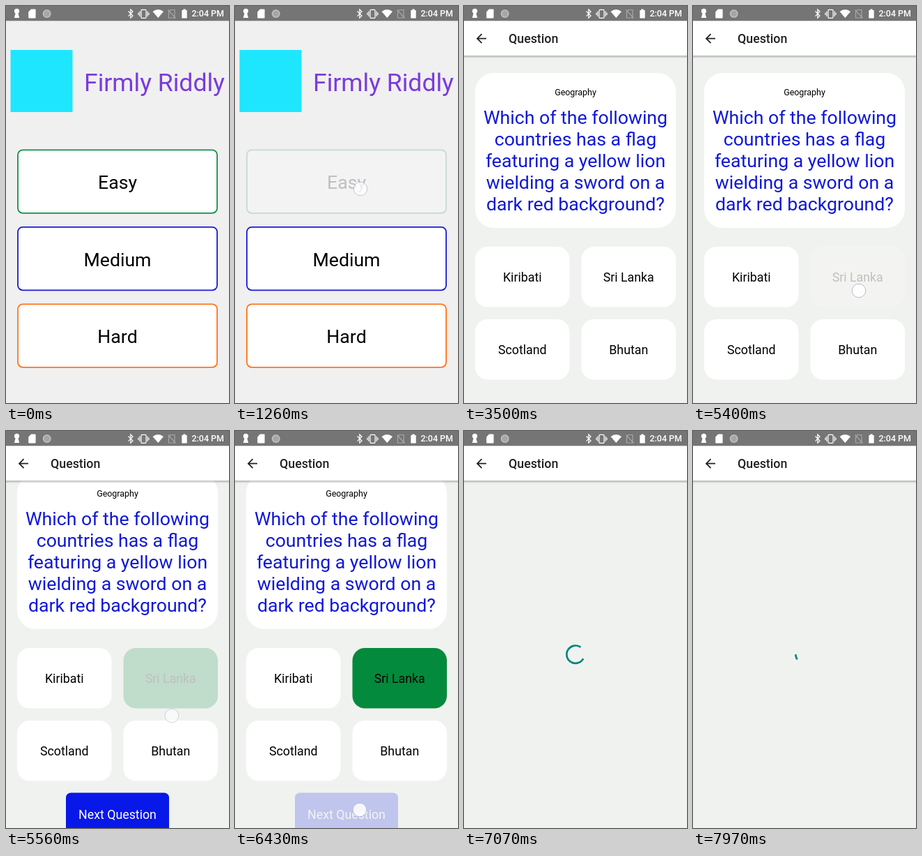
Animation of 320x569 px, one loop 8 s. Source, as an HTML page:

```html
<!DOCTYPE html>
<html lang="en">
<head>
<meta charset="utf-8">
<title>Quiz app</title>
<style>
html, body { margin: 0; width: 100%; height: 100%; overflow: hidden; background: #fff; }
svg { display: block; width: 100%; height: 100%; font-family: Roboto, "Open Sans", sans-serif; }
</style>
</head>
<body>
<svg id="stage" viewBox="0 0 320 569"></svg>
<script>
const LOOP = 8000;
const PUSH = 1319, LOADED = 1890, POP = 6527;   // screen changes
const EASY_TAP = 1130, ANSWER_TAP = 5400, NEXT_TAP = 6430;
const BG = '#f0f2ef', GREEN = '#048a3c';

// Markup helpers
const label = (x, y, size, text, fill = '#000', extra = 'text-anchor="middle"') =>
  `<text x="${x}" y="${y}" font-size="${size}" fill="${fill}" ${extra}>${text}</text>`;
const box = (x, y, w, h, r, fill, extra = '') =>
  `<rect x="${x}" y="${y}" width="${w}" height="${h}" rx="${r}" fill="${fill}" ${extra}/>`;
const group = (id, body, extra = '') => `<g id="${id}" ${extra}>${body}</g>`;
const screen = (id, bg, body) =>
  group(id, box(0, 21, 320, 548, 0, bg) + body, 'clip-path="url(#window)"');
const spinner = id =>
  `<circle id="${id}" cx="160" cy="320.2" r="12.67" pathLength="360" fill="none"
    stroke="#008577" stroke-width="2.67" stroke-linecap="square"/>`;

const level = (id, y, text, color) => group(id,
  box(17, y, 286, 90.5, 7, '#fff', `stroke="${color}" stroke-width="1.8"`) +
  label(160, y + 55.7, 26.67, text));

const answer = (id, x, y, text) => group(id,
  box(x, y, 135.5, 86.5, 17.8, '#fff') + label(x + 67.75, y + 50, 17.78, text));

const header = box(0, 71, 320, 4, 0, 'url(#shade)') + box(0, 21, 320, 50.1, 0, '#fff') +
  `<path transform="translate(14.2 36) scale(.889)" fill="#222"
    d="M20 11H7.83l5.59-5.59L12 4l-8 8 8 8 1.41-1.41L7.83 13H20z"/>` +
  label(64, 53, 17.78, 'Question', '#222', 'font-weight="500"');

const question = ['Which of the following', 'countries has a flag', 'featuring a yellow lion',
  'wielding a sword on a', 'dark red background?'];

const content =
  box(16, 96, 288, 222, 26.7, '#fff') +
  label(160, 127.5, 12.44, 'Geography') +
  question.map((line, i) => label(160, 168.6 + i * 31.1, 26.67, line, '#1018d8')).join('') +
  answer('kiribati', 16, 345, 'Kiribati') +
  answer('correct', 168.5, 345, 'Sri Lanka') +
  answer('scotland', 16, 449, 'Scotland') +
  answer('bhutan', 168.5, 449, 'Bhutan') +
  group('nextButton', box(86, 552.5, 148, 62, 7, '#0818e8') +
    label(160, 589.5, 17.78, 'Next Question', '#fff'));

const statusBar = box(0, 0, 320, 21.3, 0, '#757575') + `
  <g fill="#fff">
    <circle cx="15.5" cy="7.3" r="3.6"/><path d="M14 9h3l2.2 8h-7.4z"/>
    <path d="M36 4.6h5.6q1 0 1 1v10.8q0 1-1 1h-8.4q-1 0-1-1V8.6z"/>
    <circle cx="58.7" cy="11" r="6" fill="#bdbdbd"/>
    <circle cx="58.7" cy="11" r="4.2" fill="#a6a6a6"/>
    <path d="M210.5 8Q218.300 1.800 226 8L218.300 17z"/>
    <path d="M252.300 6h2V4.600h3.400V6h2v11.400h-7.400z"/>
  </g>
  <g fill="none" stroke="#fff" stroke-width="1.2">
    <path d="M175.500 7.500l6.500 6.600-3.200 3V5l3.200 3-6.500 6.600"/>
    <rect x="194" y="5.300" width="7" height="12" rx="1"/>
    <path d="M191.900 7.500v7.500M190 9.500v3.500M203.100 7.500v7.500M205 9.500v3.500"/>
    <path stroke="#a8a8a8" d="M236 5.500h6v11.500h-8.500V8zM232.500 5.500l11 12"/>
  </g>` + label(266.5, 15.3, 12.44, '2:04 PM', '#fff', 'font-weight="500"');

stage.innerHTML = `
  <defs>
    <clipPath id="window"><rect y="21" width="320" height="548"/></clipPath>
    <linearGradient id="shade" x2="0" y2="1">
      <stop stop-opacity=".28"/><stop offset="1" stop-opacity="0"/>
    </linearGradient>
  </defs>` +
  screen('home', '#f0f0f0',
    box(6.5, 63, 89, 89, 0, '#1ee6ff') +
    label(112, 121.5, 35.56, 'Firmly Riddly', '#7b3bdc', '') +
    level('easy', 206.3, 'Easy', '#149048') +
    level('medium', 316.8, 'Medium', '#1a1ad6') +
    level('hard', 427.3, 'Hard', '#ff7518')) +
  screen('upcoming', BG, spinner('spinB') + header) +
  screen('quiz', BG, spinner('spinA') + group('content', content) + header) +
  group('status', statusBar) +
  '<circle id="dot" r="9.8" fill="#fff" fill-opacity=".85" stroke="#b8bcd4"/>';

const $ = id => document.getElementById(id);
const set = (id, attrs) => {
  for (const k in attrs) $(id).setAttribute(k, attrs[k]);
};
const show = (id, on) => set(id, { visibility: on ? 'visible' : 'hidden' });
const clamp = x => Math.max(0, Math.min(1, x));

// Cubic Bézier easing, solved by bisection
const bezier = (x1, y1, x2, y2) => x => {
  const at = (a, b, u) => 3 * u * (1 - u) ** 2 * a + 3 * u * u * (1 - u) * b + u ** 3;
  let lo = 0, hi = 1;
  for (let i = 0; i < 24; i++) {
    const mid = (lo + hi) / 2;
    if (at(x1, x2, mid) < x) lo = mid; else hi = mid;
  }
  return at(y1, y2, lo);
};
const standard = bezier(.4, 0, .2, 1);
const emphasized = bezier(.2, 0, 0, 1);
const quad = x => x < .5 ? 2 * x * x : 1 - 2 * (1 - x) ** 2;

function place(id, scale, opacity) {
  show(id, opacity > 0);
  set(id, { opacity, transform: `translate(160 295) scale(${scale}) translate(-160 -295)` });
}

function spin(id, age) {
  age = Math.max(0, age);
  const x = age / 1333 % 1;
  const head = 270 * standard(clamp(2 * x)), tail = 270 * standard(clamp(2 * x - 1));
  const angle = age * 720 / 4444 + 90 * x + tail - 90;
  set(id, {
    transform: `rotate(${angle} 160 320.2)`,
    'stroke-dasharray': `${Math.max(.01, head - tail)} 360`
  });
}

const taps = [[EASY_TAP, 180, 262], [ANSWER_TAP, 238, 408], [NEXT_TAP, 179, 543]];

function draw(t) {
  // Screen transitions
  const push = emphasized(clamp((t - PUSH) / 300)), pushFade = clamp((t - PUSH) / 200);
  const pop = emphasized(clamp((t - POP) / 300)), popFade = clamp((t - POP) / 320);
  place('home', 1 + .15 * push, 1 - pushFade);
  place('upcoming', 1.1 - .1 * pop, popFade);
  if (t < POP) place('quiz', .85 + .15 * push, pushFade);
  else place('quiz', 1 - .1 * pop, 1 - popFade);

  spin('spinA', t - PUSH);
  spin('spinB', t - POP);
  set('spinA', { display: t < LOADED ? 'inline' : 'none' });
  set('content', { display: t < LOADED ? 'none' : 'inline' });

  // Taps and the answer
  const answered = t >= ANSWER_TAP + 140;
  set('easy', { opacity: t < EASY_TAP ? 1 : .2 });
  set('content', { transform: `translate(0 ${answered ? -34 : 0})` });
  set('correct', { opacity: t < ANSWER_TAP ? 1 : .2 + .8 * quad(clamp((t - ANSWER_TAP - 160) / 250)) });
  $('correct').firstChild.setAttribute('fill', answered ? GREEN : '#fff');
  set('nextButton', { display: answered ? 'inline' : 'none', opacity: t < NEXT_TAP ? 1 : .2 });

  const tap = taps.find(([start]) => t >= start && t < start + 250);
  show('dot', tap);
  if (tap) set('dot', { cx: tap[1], cy: tap[2], opacity: clamp((tap[0] + 250 - t) / 140) });
}

const begin = performance.now();
function tick() {
  draw((performance.now() - begin) % LOOP);
  requestAnimationFrame(tick);
}
tick();
</script>
</body>
</html>
```
